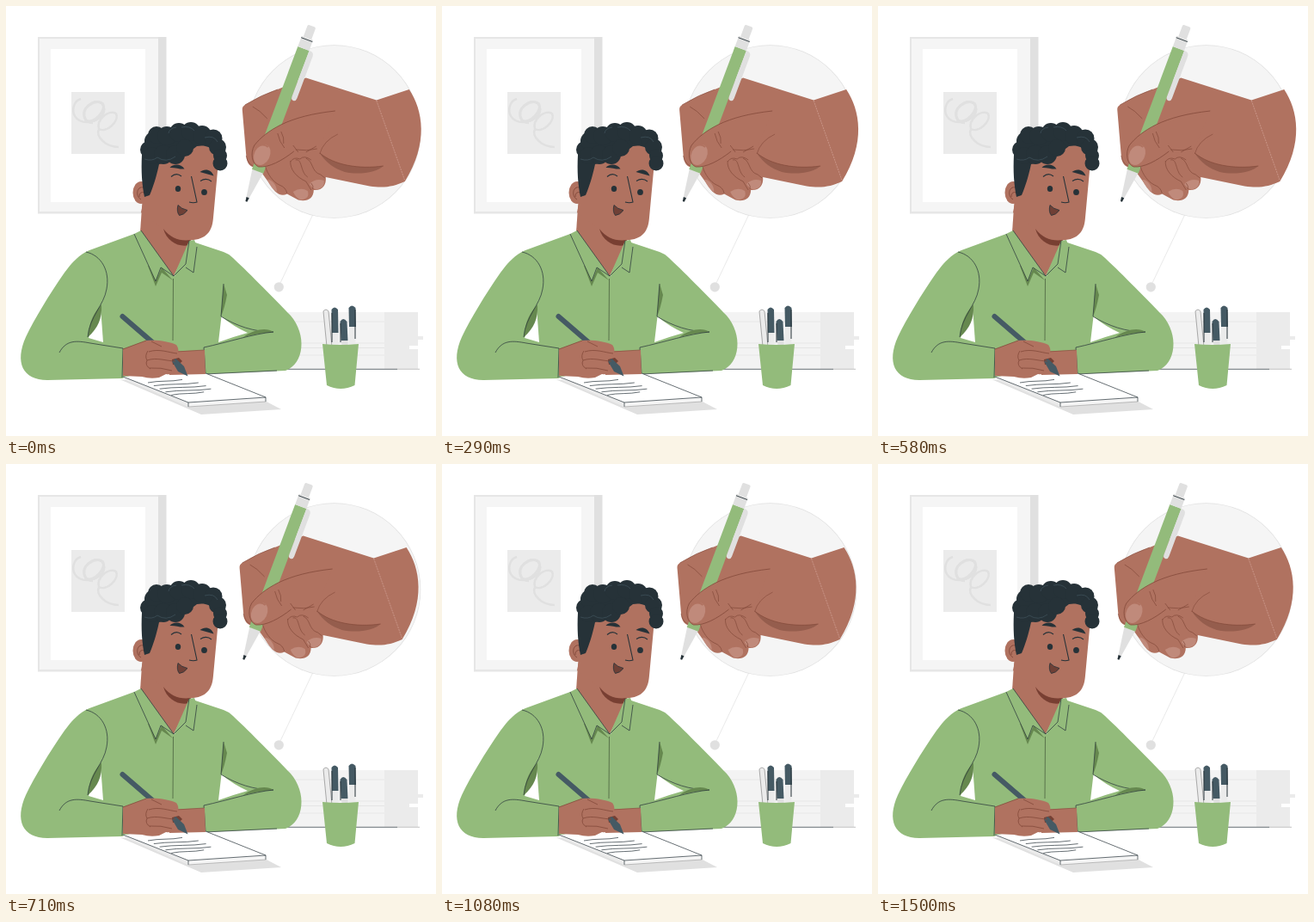
An HTML page with a canvas that plays this animation: 500x500 px, repeating every 1.54 s.

```html
<!DOCTYPE html>
<html lang="en">
<head>
<meta charset="utf-8">
<title>Writing</title>
<style>
  html, body { margin: 0; width: 100%; height: 100%; overflow: hidden; background: #fff; }
  canvas { display: block; width: 100vw; height: 100vh; }
</style>
</head>
<body>
<canvas id="stage" width="500" height="500"></canvas>
<script>
const ctx = document.getElementById('stage').getContext('2d');
const LOOP = 1540, FPS = 24;
const INK = '#263238', SLATE = '#455a64', GREEN = '#93bb7b', DEEP = '#66884f';
const SKIN = '#b07260', CREASE = '#83493a', SHADE = '#955d4d', NAIL = '#c08a7b';
const PALE = '#f5f5f5', MIST = '#ebebeb', GREY = '#e0e0e0';

function fill(d, color) {
  ctx.fillStyle = color;
  ctx.fill(new Path2D(d));
}
function line(d, color = INK, width = 0.7) {
  ctx.strokeStyle = color;
  ctx.lineWidth = width;
  ctx.stroke(new Path2D(d));
}
function rect(x, y, w, h, color) {
  ctx.fillStyle = color;
  ctx.fillRect(x, y, w, h);
}
function oval(x, y, rx, ry, color, turn = 0) {
  ctx.fillStyle = color;
  ctx.beginPath();
  ctx.ellipse(x, y, rx, ry, turn, 0, Math.PI * 2);
  ctx.fill();
}

function wallPicture() {
  rect(177, 36, 9.5, 205.5, GREY);
  rect(37, 36, 140, 205.5, '#e6e6e6');
  rect(39, 38, 138, 201, PALE);
  rect(52, 50, 110, 178, '#fff');
  rect(76, 100, 62, 72, MIST);
  line('M87 108 C79 110 76 121 80 128 C86 138 104 137 112 127 C119 117 109 107 99 113 C87 120 88 136 101 136', GREY, 2.5);
  line('M91 128 C89 118 103 108 112 113 C118 121 102 138 93 133Z', GREY, 3);
  line('M108 143 C105 132 119 120 128 125 C132 134 117 148 108 143 C104 152 116 164 131 164', GREY, 2.5);
}

function books() {
  rect(328, 356, 112, 66, '#f3f3f3');
  rect(440, 356, 39, 66, MIST);
  for (const y of [367, 392, 397.5, 406]) line(`M328 ${y}H440`, GREY);
  rect(469, 395, 11, 4, '#fff');
  rect(478, 384, 7, 4, MIST);
  line('M318 422.3H455', INK, 0.7);
  line('M455 422.3H481', '#aaa', 0.7);
}

function cup() {
  fill('M369 355 Q372 351 375 355 L379 396 H373Z', MIST);
  line('M369 355 Q372 351 375 355 L379 396 M369 355 L373 396', '#777', 0.6);
  fill('M378.5 353 Q382 348 386 353 L386.5 380 H379Z', SLATE);
  fill('M379 380 H386.5 V395 H380Z', MIST);
  fill('M388.5 367 Q392 361 396.5 367 L397.5 389 H389.5Z', SLATE);
  fill('M390 389 H397.5 V396 H390.5Z', GREY);
  fill('M398.5 351 Q402 346 406.5 351 L407 373 H399Z', SLATE);
  fill('M399 373 H407 L406 395 H399Z', MIST);
  line('M379 357 V391 M406 353 V387 M389 369 V391', INK, 1);
  fill('M368 393 Q389 395 410 393 L405.5 441 Q389 449 373 441Z', GREEN);
}

function hair() {
  fill('M158 173 L172 153 L200 144 L243 151 L255 184 L246 190 C246 170 238 160 222 163 L205 176 L178 184 C175 198 171 211 167 220 L161 222 C158 208 157 192 158 173Z', INK);
  const curls = [[166, 167, 10], [172, 157, 11], [175, 150, 10], [187, 151, 11],
    [201, 147, 11], [215, 146, 11], [228, 150, 11], [241, 154, 10.5], [246, 164, 10],
    [249, 174, 8], [249, 183, 8.5], [170, 174, 10], [183, 173, 11], [197, 173, 11], [208, 165, 10]];
  for (const [x, y, r] of curls) oval(x, y, r, r, INK);
  line('M161 178 Q170 181 176 176 Q186 183 197 175 M189 148 Q190 142 198 141 M204 141 Q214 139 219 145 M231 153 Q242 150 246 158', SLATE, 0.6);
}

function head() {
  fill('M159 220 L156 263 L195 314 L214 276 L215 240Z', SKIN);
  oval(157, 217, 9.5, 13, SKIN);
  line('M160 211 C152 209 150 221 157 225 M161 217 Q155 215 155 222', CREASE, 0.9);
  fill('M168 180 L161 222 L157 240 L184 261 C192 270 205 274 218 272 C235 270 240 260 241 246 L246 192 C248 160 224 152 190 169Z', SKIN);
  fill('M183 259 C191 270 203 274 215 272 L213 278 C201 281 187 274 183 259Z', '#783f32');
  hair();
  oval(200, 212.5, 3.2, 3.5, INK);
  oval(230.5, 216.5, 3.4, 3.6, INK);
  fill('M190.5 188 C194 183 204 183 207.5 189.5 C202 190 196 187.5 190.5 188Z', INK);
  fill('M225.5 193 C231 188.5 239 190 241.5 197.5 C236 196 231 194.5 225.5 193Z', INK);
  line('M192 198.5 Q198 193 204 198 M226 203.5 Q233 199 239 204', INK, 1.1);
  line('M215.5 198 L222 228 Q218 229.5 213 228', INK, 1.1);
  const mouth = 'M200 231.5 Q204 236 211 237.5 Q207 243 201.5 243.5 Q198 239 200 231.5Z';
  fill(mouth, '#6f4036');
  line(mouth, INK, 0.8);
}

function shirt() {
  fill('M149 265 L97 284 C85 289 77 298 68 310 C50 336 33 364 23 385 C10 414 19 435 48 435 L135 433 L150 428 H232 L325 424 C347 416 350 382 331 360 C308 336 278 306 264 293 Q259 288 253 286 L220 275 L196 314Z', GREEN);
}

function shirtDetails() {
  // Openings between the arms and the body.
  fill('M110 350 L96 386 L113 391Z', '#fff');
  fill('M250.5 361 L247 391 Q263 385 281 380 Q265 373 250.5 361Z', '#fff');

  fill('M165 302 L174 326 L181 310 L194 319 L180 303Z', DEEP);
  fill('M149 265 L157 261 L195 314 L181 304 L174 320Z', GREEN);
  line('M149 265 L174 320 L180 304 L195 314 L157 261');
  fill('M213 273 L219 272 L222 280 L218 310 L209 304 L195 314Z', GREEN);
  line('M213 273 L209 300 L195 314 M209 304 L218 310 L222 280');
  line('M194.5 317 L194 389', '#405335', 0.7);
  fill('M111 347 C103 356 97 365 95 385 C107 375 112 363 111 347Z', DEEP);
  line('M93 286 C111 290 121 308 117 329 C114 348 97 361 95 385');
  fill('M253 323 L257 336 Q254 352 250 361Z', DEEP);
  line('M253 323 L250 361 C268 372 288 379 311 379');
  fill('M276 385 C289 375 304 374 311 379 C299 380 287 382 276 385Z', DEEP);
  line('M62 403 C70 388 82 389 98 392 L136 398 L135 432');
  line('M311 379 C288 381 258 391 230 397 L232 428 L315 424');
}

function paper() {
  fill('M132 434 L227 475 L320 469 L299 458Z', GREY);
  fill('M136 431 L212 461 V466 L139 435Z', MIST);
  fill('M212 461 L302 455 V460 L212 466Z', PALE);
  fill('M136 431 L232 427 L302 455 L212 461Z', '#fff');
  line('M232 427 L302 455 L212 461 L136 431 M212 461 V466 M302 455 V460', INK, 0.7);
  line('M302 460 L212 466', '#888', 0.5);
  for (let row = 0; row < 5; row++) {
    const w = [40, 52, 54, 53, 38][row];
    line(`M${165 + row * 6.8} ${438 + row * 3.6} q${w / 4} -1.8 ${w / 2} -1.8 t${w / 2} -1.8`, INK, 0.7);
  }
}

function writingHands() {
  fill('M185 402 L231 400 L232 428 L190 429Z', SKIN);
  line('M198 402 L230 400', CREASE, 0.6);
  ctx.lineCap = 'round';
  line('M135.5 361 L190 408', SLATE, 6);
  ctx.lineCap = 'butt';
  fill('M136 399 L163 389 C176 388 190 390 198 394 C201 398 201 402 199 406 L203 411 Q204 416 198 416 L196 425 Q193 429 186 428 L178 432 Q168 434 158 431 L136 430Z', SKIN);
  fill('M193 411 L201 409 L205 413 Q202 417 194 417Z', '#744034');
  fill('M193 413 L197.5 410 L207 419 L211.5 430.5 L200 425Z', SLATE);
  line('M136 399 L163 389 M166 402 C178 398 189 403 199 404 M164 412 C175 408 187 413 197 413 M167 421 Q180 420 193 424 M165 401 Q161 407 164 412 Q161 418 168 422 M169 390 L181 396', CREASE, 0.8);
}

function pen() {
  ctx.save();
  ctx.translate(279.6, 227.4);
  ctx.rotate(20.5 * Math.PI / 180);
  fill('M-1 0 H1 L6.7 -38 H-6.7Z', GREY);
  fill('M-1 0 H1 L1.7 -5 H-1.7Z', INK);
  rect(-7, -190, 14.2, 152.5, GREEN);
  fill('M7 -190 H9.5 Q13.2 -189 13.2 -185 V-133 Q13 -129 10 -129 Q7 -129 7 -133Z', GREY);
  rect(-7, -203, 14, 13, GREY);
  fill('M-5 -203 V-216 Q-5 -218 -3 -218 H3 Q5 -218 5 -216 V-203Z', GREY);
  line('M-7 -201 H7', INK, 0.8);
  ctx.restore();
}

function closeUp(shift) {
  ctx.save();
  ctx.translate(shift, 0);
  fill('M275 121 Q274.5 117 278 115 Q298 103 316 97 L349 83.5 L431 109.5 L469 97 C485 121 492 159 464 204 C451 210 440 212 423 209.5 L372 199 C373 208 368 215 358 214 C358 224 350 228 340 225.5 L327 218.5 Q320 222 313 215.5 L294 189 C283 188 280 182 279.5 174Z', SKIN);
  line('M278 115 Q298 103 316 97 M279.5 174 Q281 185 292 188', CREASE, 0.6);
  line('M287 117 Q295 121 304 131', CREASE, 0.7);
  pen();
  const thumb = 'M383 122 C356 125 337 130 320 138 C306 145 296 153 289 162 C284 171 286 184 294 187 C306 188 321 180 335 169';
  fill(thumb + 'L365 165Z', SKIN);
  line(thumb, CREASE, 0.8);
  oval(298, 173, 9, 12.5, NAIL, 0.45);
  line('M290 166 Q298 158 305 164', SKIN, 2);
  line('M316 148 Q318 158 324 165 M320 146 Q324 153 323 160', CREASE, 0.7);

  fill('M304 202 C310 201 316 210 315 216.5 Q309 213 304 202Z', NAIL);
  fill('M334 216 Q343 210 351 215 Q354 224 343 225.5 Q337 223 334 216Z', NAIL);
  fill('M353 207 Q360 200 370 203 Q371 212 361 213.5 Q356 212 353 207Z', NAIL);
  line('M302 187 C304 195 311 205 318 208 Q326 211 327 218 M357 213 Q358 209 355 206', CREASE, 0.7);
  line('M334 162 L340 170 M337 167 Q350 169 362 166 M349 170 L361 163', CREASE, 0.7);
  line('M331 180 C330 190 338 199 349 204 L355 214 M337 179 C345 177 342 193 351 199 M349 177 C358 181 355 193 366 196 L371 200 M331 181 Q335 175 342 178 Q347 173 355 179', CREASE, 0.7);
  line('M386 149 Q369 157 365 172', CREASE, 0.6);
  fill('M365 171 C382 185 410 190 439 186 C432 193 412 197 394 193 C382 189 372 182 365 171Z', SHADE);
  line('M365 171 C382 185 410 190 439 186', CREASE, 0.7);
  ctx.setLineDash([2, 1]);
  line('M431 110 L464 203', '#d3a397', 0.7);
  ctx.setLineDash([]);
  ctx.restore();
}

// Horizontal shake: offsets at every tenth of a 1.5 s cycle.
function shakeAt(ms) {
  const keys = [0, -1, 2, -4, 4, -4, 4, -4, 2, -1, 0];
  const pos = (ms % 1500) / 150;
  const i = Math.floor(pos);
  return keys[i] + (keys[i + 1] - keys[i]) * (pos - i);
}

function draw(now) {
  const step = Math.floor(((now % LOOP) + 5) * FPS / 1000);
  rect(0, 0, 500, 500, '#fff');
  wallPicture();
  books();
  cup();
  line('M319 322 L358 240', GREY, 0.7);
  oval(317.3, 326.8, 5.6, 5.6, GREY);
  oval(381.5, 146, 100.8, 100.8, GREY);
  oval(381.5, 146, 100.1, 100.1, PALE);
  shirt();
  head();
  shirtDetails();
  paper();
  writingHands();
  closeUp(shakeAt(step * 1000 / FPS + 30));
  requestAnimationFrame(draw);
}
ctx.lineJoin = 'round';
requestAnimationFrame(draw);
</script>
</body>
</html>
```
